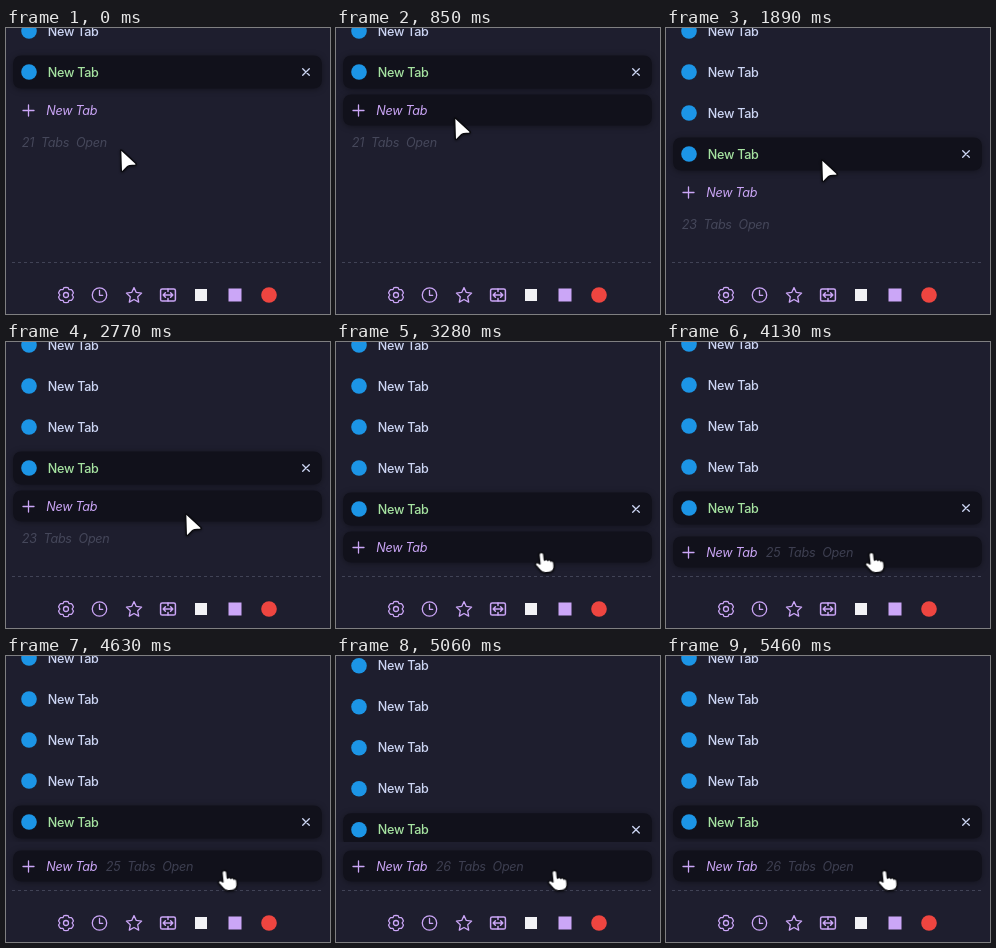
An HTML page that plays this animation: 324 by 286 pixels, repeating every 5810 ms.

```html
<!DOCTYPE html>
<html lang="en">
<head>
<meta charset="utf-8">
<title>Vertical tabs</title>
<style>
  html, body { margin: 0; width: 100%; height: 100%; overflow: hidden; background: #1e1e2e; }
  svg { display: block; width: 100%; height: 100%; }
  text { font: 450 12.6px Inter, "Liberation Sans", sans-serif; letter-spacing: -.28px; fill: #cdd6f4; }
  .row { fill: #11111b; filter: drop-shadow(0 1px 3px rgba(0, 0, 0, .36)); }
  .line { fill: none; stroke: #cba6f7; stroke-width: 1.3; stroke-linecap: round; stroke-linejoin: round; }
  .add { font-style: italic; fill: #cba6f7; }
  .count { font-style: italic; fill: #45475a; word-spacing: 3.6px; }
  .pointer { fill: #fff; stroke: #0b0b10; stroke-width: 1.5; stroke-linejoin: round;
             filter: drop-shadow(0 1px 1px rgba(0, 0, 0, .4)); }
</style>
</head>
<body>
<svg viewBox="0 0 324 286" xmlns="http://www.w3.org/2000/svg">
  <defs><clipPath id="clip"><rect id="view" width="324" height="228"/></clipPath></defs>
  <rect width="324" height="286" fill="#1e1e2e"/>

  <g clip-path="url(#clip)">
    <g id="list">
      <rect class="row" x="7" y="-16.5" width="309" height="33" rx="8"/>
      <path d="M296.7 -3.3l6.6 6.6m0 -6.6l-6.6 6.6" fill="none" stroke="#cdd6f4" stroke-width="1.3" stroke-linecap="round"/>
    </g>
  </g>

  <g id="button">
    <rect id="hover" class="row" x="7" y="-15.5" width="309" height="31" rx="8"/>
    <path class="line" d="M17 .5h11m-5.5 -5.5v11"/>
    <text class="add" x="40.2" y="4.7">New Tab</text>
  </g>
  <text id="count" class="count"></text>

  <path d="M6 234.5H316" stroke="#414356" stroke-dasharray="3 3"/>

  <g class="line">
    <path id="gear"/><circle cx="60" cy="267" r="2.5"/>
    <circle cx="93.5" cy="267" r="7.2"/><path d="M93.5 262.5v4.8h3.2"/>
    <path id="star"/>
    <rect x="154.6" y="261" width="14.8" height="12" rx="1.6" stroke-width="1.5"/>
    <path stroke-width="1.5" d="M157.3 267h9.4m-7.3 -2.2l-2.2 2.2l2.2 2.2m5.2 -4.4l2.2 2.2l-2.2 2.2M162 261v2.6m0 6.8v2.6"/>
  </g>
  <rect x="189" y="261" width="12" height="12" fill="#f2f2f5"/>
  <rect x="222.5" y="260.5" width="13" height="13" fill="#cba6f7"/>
  <circle cx="263" cy="267" r="7.8" fill="#ee4540"/>

  <g id="arrow">
    <path class="pointer" d="M.6 2Q.5 .2 2 1.4L15.8 14.2Q17.2 15.9 15 16.3L9.6 16.8Q8.3 17 7.4 17.9L3.2 22Q1.5 23.3 1.2 21.1Z"/>
  </g>
  <g id="hand">
    <path class="pointer" transform="translate(.2 -.6) rotate(-6) scale(1 .97)" d="M-2.5 2.4a2.4 2.4 0 0 1 4.9 0V8.3Q4.6 6.8 5.8 8.9Q8 7.9 8.8 10Q11.3 9.5 11.5 12.4V15Q11.3 21.3 6 21.3H2Q-1 21.3 -3 18.2L-6.6 13Q-7.8 10.5 -5.4 9.9Q-4.2 9.8 -2.5 11.7Z"/>
  </g>
</svg>
<script>
const LOOP = 5810, STEP = 41;
const $ = id => document.getElementById(id);
const clamp = v => Math.min(1, Math.max(0, v));
const place = (el, x, y) => el.setAttribute("transform", `translate(${x} ${y})`);
const show = (el, on) => el.setAttribute("visibility", on ? "visible" : "hidden");

// Times at which tabs 22 to 26 open.
const opens = [900, 1810, 2810, 3620, 4920];
// Pressed spans show the plain arrow.
const presses = [[850, 900], [1770, 1810], [2770, 2810]];
// Pointer moves: start, end, x, y.
const moves = [
  [20, 240, 118, 89], [1110, 1380, 155, 131], [1890, 2200, 179, 171],
  [3060, 3280, 205, 211], [4210, 4320, 212, 213], [4490, 4630, 218, 215]
];

function polar(cx, cy, n, radius) {
  let d = "";
  for (let i = 0; i < n; i++) {
    const a = i * 2 * Math.PI / n - Math.PI / 2, r = radius(i);
    d += `${i ? "L" : "M"}${(cx + r * Math.cos(a)).toFixed(2)} ${(cy + r * Math.sin(a)).toFixed(2)}`;
  }
  return d + "Z";
}
$("star").setAttribute("d", polar(128, 267.6, 10, i => i % 2 ? 3.9 : 8));
$("gear").setAttribute("d", polar(60, 267, 24, i => (i + 1) % 4 < 3 ? 7.7 : 6.1));

const list = $("list");
for (let i = 0; i < 7; i++) {
  const y = -i * STEP;
  list.insertAdjacentHTML("beforeend",
    `<circle cx="23" cy="${y}" r="7.8" fill="#1c95e6"/>
     <text x="41.8" y="${y + 4.7}"${i ? "" : ' style="fill:#a6e3a1"'}>New Tab</text>`);
}

function pointer(t) {
  let x = 114, y = 121;
  for (const [a, b, px, py] of moves) {
    const p = clamp((t - a) / (b - a)), e = p * p * (3 - 2 * p);
    x += (px - x) * e;
    y += (py - y) * e;
  }
  return [x, y];
}

function activeY(t, tabs) {
  if (tabs < 25) return 44 + (tabs - 21) * STEP;
  const left = (start, end) => Math.pow(1 - clamp((t - start) / (end - start)), 3.72);
  return tabs === 25 ? 166 + 42 * left(3620, 4180) : 166 + STEP * left(4920, 5310);
}

function draw(t) {
  const tabs = 21 + opens.filter(o => t >= o).length;
  const pinned = tabs > 24;
  const y = activeY(t, tabs);
  const by = pinned ? 210 : y + 38;
  const [px, py] = pointer(t);
  const over = Math.abs(py - by) < 15.5;
  const pressed = presses.some(([a, b]) => t >= a && t < b);

  place(list, 0, y);
  $("view").setAttribute("height", pinned ? 186 : 228);
  place($("button"), 0, by);
  show($("hover"), over);

  const count = $("count");
  count.textContent = `${tabs} Tabs Open`;
  count.setAttribute("opacity", pinned ? .85 : 1);
  place(count, pinned ? 99.8 : 15.8, (pinned ? by : y + 70) + 4.7);
  show(count, pinned || tabs < 24);

  const hand = over && !pressed;
  show($("hand"), hand);
  show($("arrow"), !hand);
  place($("hand"), px, py);
  place($("arrow"), px, py);
}

const start = performance.now();
function frame() {
  draw((performance.now() - start) % LOOP);
  requestAnimationFrame(frame);
}
draw(0);
requestAnimationFrame(frame);
</script>
</body>
</html>
```
